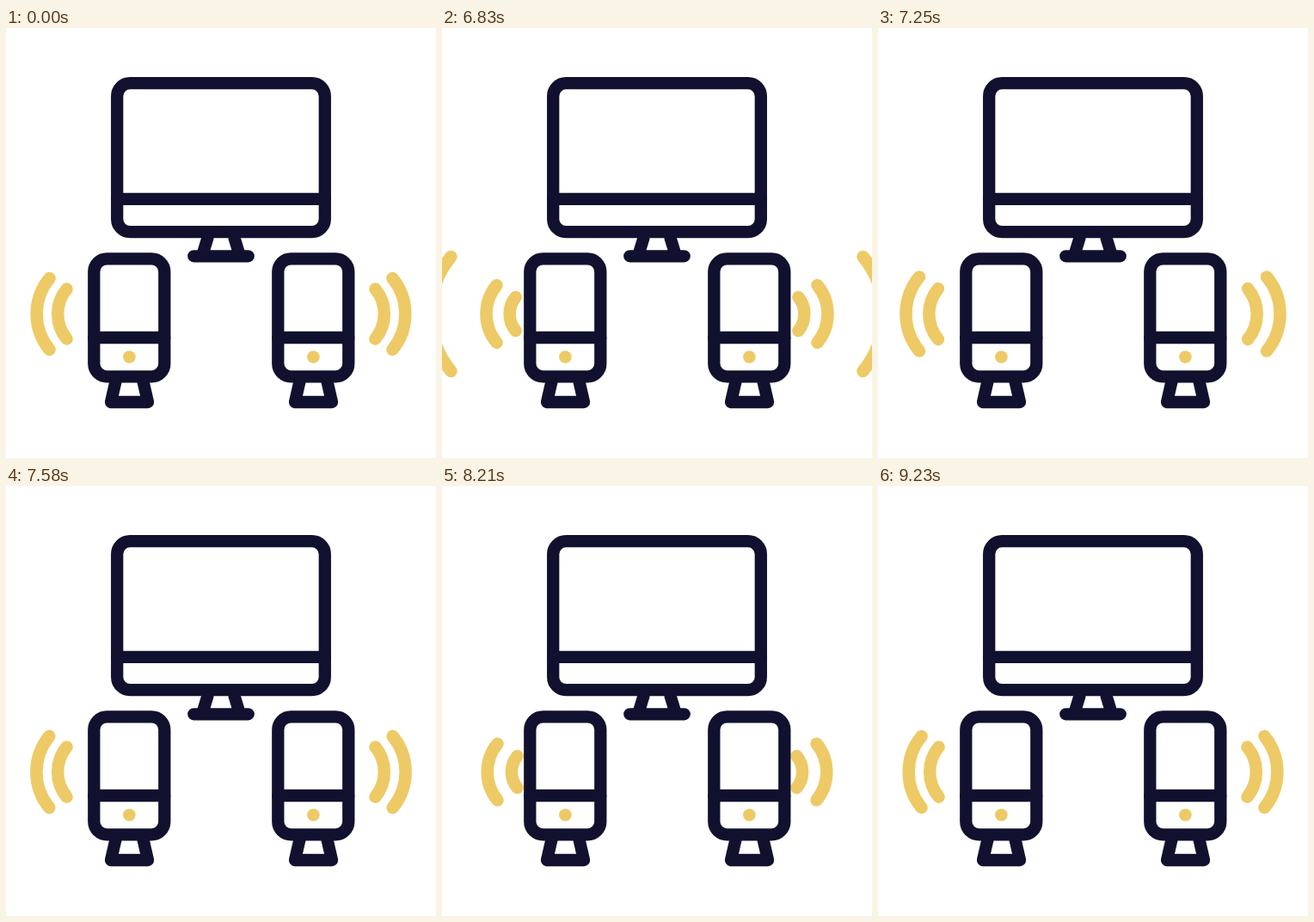
An HTML page that plays this animation: 500x500 px, repeating every 9260 ms.

```html
<!DOCTYPE html>
<html lang="en">
<head>
<meta charset="utf-8">
<title>Connected devices</title>
<style>
  html, body { margin: 0; width: 100%; height: 100%; overflow: hidden; background: #fff; }
  svg { display: block; width: 100%; height: 100%; }
  .ink { fill: none; stroke: #11112f; stroke-width: 14.3; stroke-linecap: round; stroke-linejoin: round; }
  .wave { fill: none; stroke: #edca66; stroke-width: 14.5; stroke-linecap: round; }
  .body { fill: #fff; }
  .dot { fill: #edca66; stroke: none; }
</style>
</head>
<body>
<svg viewBox="0 0 500 500">
  <defs>
    <g id="phone" class="ink">
      <path class="body" d="M127.5 411 L122 435 H165 L159.5 411"/>
      <rect class="body" x="102.3" y="268.3" width="82" height="137" rx="15"/>
      <path d="M102.3 360 H184.3"/>
      <circle class="dot" cx="143.4" cy="382.5" r="7.3"/>
    </g>
    <g id="waves" class="wave"><path/><path/><path/></g>
  </defs>

  <g class="ink">
    <path d="M234.5 244 L229 262 M265.5 244 L271 262 M218.3 265.3 H281.7"/>
    <rect x="129.2" y="64.2" width="241.6" height="173" rx="15"/>
    <path d="M129.2 198.8 H370.8"/>
  </g>

  <use href="#waves"/>
  <use href="#waves" transform="translate(500 0) scale(-1 1)"/>
  <use href="#phone"/>
  <use href="#phone" x="214"/>
</svg>
<script>
  const LOOP = 9260, START = 6530, STEP = 30;
  const INNER = 29, OUTER = 41.5, HIDDEN = 4;
  const PULSES = [
    { squash: 6500, mid: 6710, fresh: 6640 },
    { squash: 7780, mid: 8100, fresh: 8030 }
  ];
  const phone = document.getElementById('phone');
  const arcs = document.querySelectorAll('#waves path');

  const clamp = v => Math.min(1, Math.max(0, v));
  const smooth = v => v * v * (3 - 2 * v);

  // Grow past the goal, then ease back to it.
  function settle(t, from, peak, to, rise) {
    if (t < rise) return from + (peak - from) * smooth(clamp(t / rise));
    return to + (peak - to) * (1 - clamp((t - rise) / 780)) ** 3;
  }

  // Arc of half-height h, scaled about a point behind the phone.
  function arc(h) {
    const x = 117 - 1.6 * h, r = 1.569 * h;
    return `M${x} ${332.5 - h} A${r} ${r} 0 0 0 ${x} ${332.5 + h}`;
  }

  function draw(time) {
    const t = time < START ? 0 : START + Math.floor((time - START) / STEP) * STEP;
    const pulse = PULSES[t < PULSES[1].squash ? 0 : 1];
    const since = Math.max(0, t - pulse.squash);

    const s = Math.sin(Math.PI * clamp(since / 260));
    phone.setAttribute('transform',
      `translate(143.4 441) scale(${1 + 0.04 * s} ${1 - 0.039 * s}) translate(-143.4 -441)`);

    const sizes = [
      OUTER + 2.3e-4 * since * since,
      settle(t - pulse.mid, INNER, 45.2, OUTER, 350),
      settle(t - pulse.fresh, HIDDEN, 30.5, INNER, 340)
    ];
    arcs.forEach((a, i) => a.setAttribute('d', arc(sizes[i])));
  }

  const t0 = performance.now();
  function tick() {
    draw((performance.now() - t0) % LOOP);
    requestAnimationFrame(tick);
  }
  tick();
</script>
</body>
</html>
```
